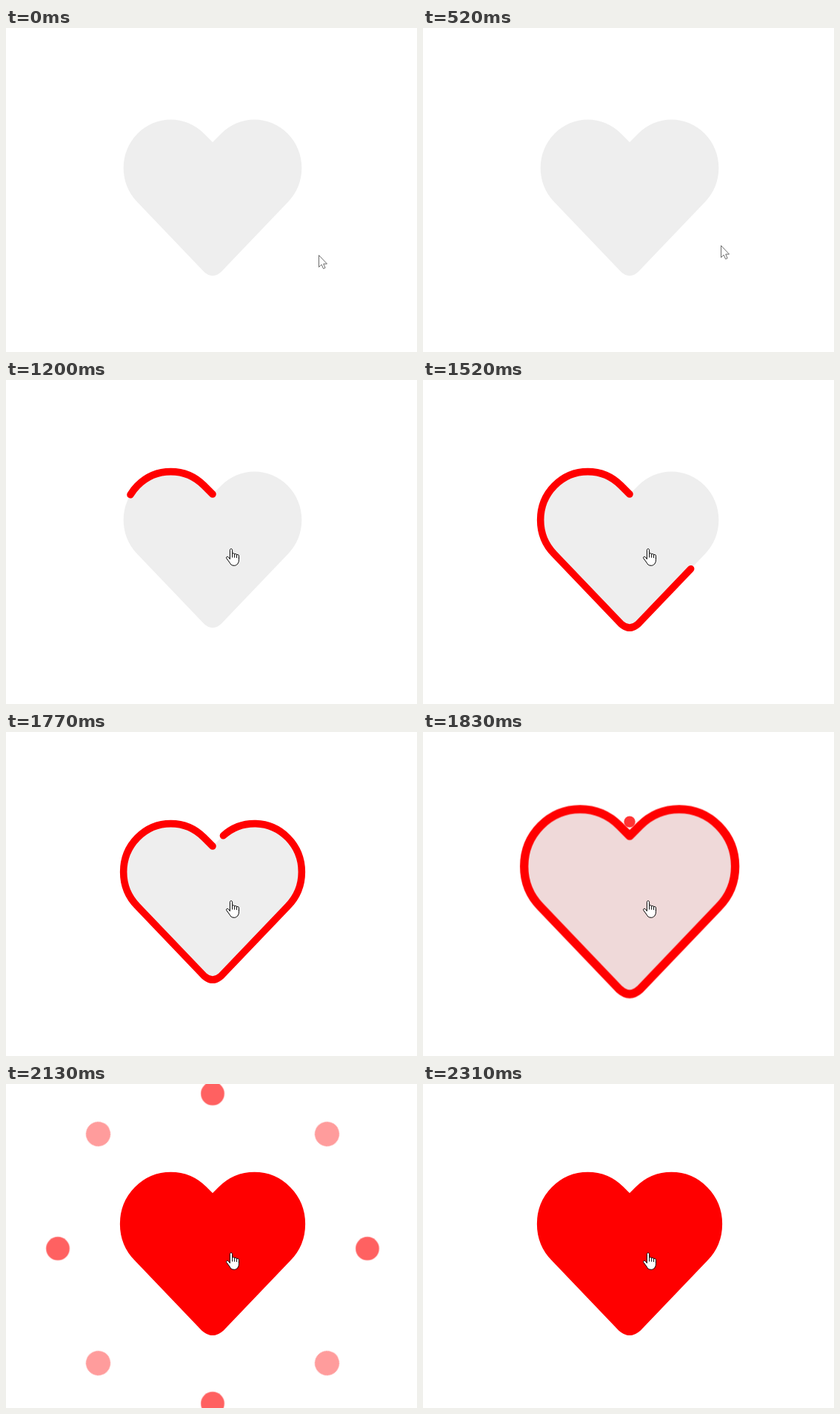
An HTML page without scripts for the animation above (2500 ms loop, 555 by 437 pixels).

```html
<!DOCTYPE html>
<html lang="en">
<head>
<meta charset="utf-8">
<title>Like heart</title>
<style>
  html, body { margin: 0; width: 100%; height: 100%; overflow: hidden; background: #fff; }
  svg { display: block; width: 555px; height: 437px; }

  .cursor, .arrow, .hand, .heart, .fill, .line, .dots {
    animation: 2500ms step-end infinite;
  }

  /* Pointer: glides in, turns into a hand over the heart */
  .cursor { animation-name: glide; }
  .cursor path { fill: #fff; stroke-width: 1; stroke-linejoin: round; }
  .arrow { stroke: #6b6b6b; animation-name: arrow; }
  .hand { stroke: #000; animation-name: hand; }
  @keyframes glide {
    0% { transform: translate(422px, 306px); }
    20.8% { transform: translate(402px, 293px); animation-timing-function: steps(5); }
    33.2%, 100% { transform: translate(304px, 227px); }
  }
  @keyframes arrow { 0% { opacity: 1; } 28.24%, 100% { opacity: 0; } }
  @keyframes hand { 0% { opacity: 0; } 28.24%, 100% { opacity: 1; } }

  /* Heart: outline draws itself, then the shape pops and fills */
  .heart { transform-origin: 279px 229.5px; animation-name: pop; }
  .base { fill: #eee; }
  .fill { fill: #f00; animation-name: fill; }
  .line {
    fill: none; stroke: #f00; stroke-width: 9.6;
    stroke-linecap: round; stroke-linejoin: round;
    stroke-dasharray: 100; animation-name: draw;
  }
  @keyframes draw {
    0% { stroke-dashoffset: 97.7; opacity: 0; }
    40.4% { stroke-dashoffset: 97.7; opacity: 1; animation-timing-function: steps(8); }
    60.8% { stroke-dashoffset: 34; opacity: 1; animation-timing-function: steps(4); }
    70.8% { stroke-dashoffset: 2.8; opacity: 1; }
    73.2%, 100% { stroke-dashoffset: 0; opacity: 1; }
  }
  @keyframes pop {
    0% { transform: scale(1); }
    73.2% { transform: scale(1.184); animation-timing-function: steps(2); }
    78% { transform: scale(1.056); }
    80.4%, 100% { transform: scale(1); }
  }
  @keyframes fill {
    0% { opacity: 0; }
    73.2% { opacity: .09; animation-timing-function: steps(2); }
    78% { opacity: .715; }
    80.4%, 100% { opacity: 1; }
  }

  /* Burst: two rings of four dots */
  .dots { fill: #f00; }
  .near { animation-name: near; }
  .far { animation-name: far; }
  @keyframes near {
    0% { transform: scale(.5); opacity: 0; }
    73.2% { transform: scale(1.01); opacity: .8; animation-timing-function: steps(2); }
    78% { transform: scale(1.63); opacity: .8; animation-timing-function: steps(2); }
    82.8% { transform: scale(2.006); opacity: .68; }
    85.2% { transform: scale(2.09); opacity: .62; animation-timing-function: steps(3); }
    92.4%, 100% { transform: scale(2.33); opacity: 0; }
  }
  @keyframes far {
    0% { transform: scale(.3); opacity: 0; }
    73.2% { transform: scale(.7); opacity: .75; animation-timing-function: steps(2); }
    78% { transform: scale(1.335); opacity: .65; animation-timing-function: steps(3); }
    85.2% { transform: scale(2.185); opacity: .39; animation-timing-function: steps(3); }
    92.4%, 100% { transform: scale(2.6); opacity: 0; }
  }
</style>
</head>
<body>
<svg viewBox="0 0 555 437">
  <defs>
    <path id="shape" pathLength="100" d="M279 154L267.5 142.5C242.5 117.3 202.5 117.3 177.5 142.5C152.4 168 152.4 209.5 177.5 235L267.5 329Q279 339.4 290.5 329L380.5 235C405.6 209.5 405.6 168 380.5 142.5C355.5 117.3 315.5 117.3 290.5 142.5L279 154"/>
    <g id="ring">
      <circle cy="-100" r="7.6"/>
      <circle cx="100" r="7.6"/>
      <circle cy="100" r="7.6"/>
      <circle cx="-100" r="7.6"/>
    </g>
  </defs>

  <g transform="translate(279 222)">
    <g class="dots near"><use href="#ring"/></g>
    <g class="dots far"><use href="#ring" transform="rotate(45)"/></g>
  </g>

  <g class="heart">
    <use class="base" href="#shape"/>
    <use class="fill" href="#shape"/>
    <use class="line" href="#shape"/>
  </g>

  <g class="cursor">
    <path class="arrow" d="M.5 .5V16.5L4.1 13.1L6.6 18.6L9.1 17.5L6.7 12.1H11.5Z"/>
    <g class="hand">
      <g transform="translate(-7.3 0)">
        <path d="M5.7 14.5V2.3C5.7 .2 8.9 .2 8.9 2.3V7.6C9.4 6.2 12 6.4 12 8.2C12.5 7 14.9 7.2 14.9 9C15.5 8 17.8 8.3 17.8 10.2V15.5C17.8 20 15 23.3 11.5 23.3C7.5 23.3 6.6 21.5 5.3 19.3L1 13.4C.3 11.4 2.4 10.6 3.6 11.9Z"/>
        <path d="M8.9 7.6V12.5M12 8.2V12.7M14.9 9V13"/>
      </g>
    </g>
  </g>
</svg>
</body>
</html>
```
